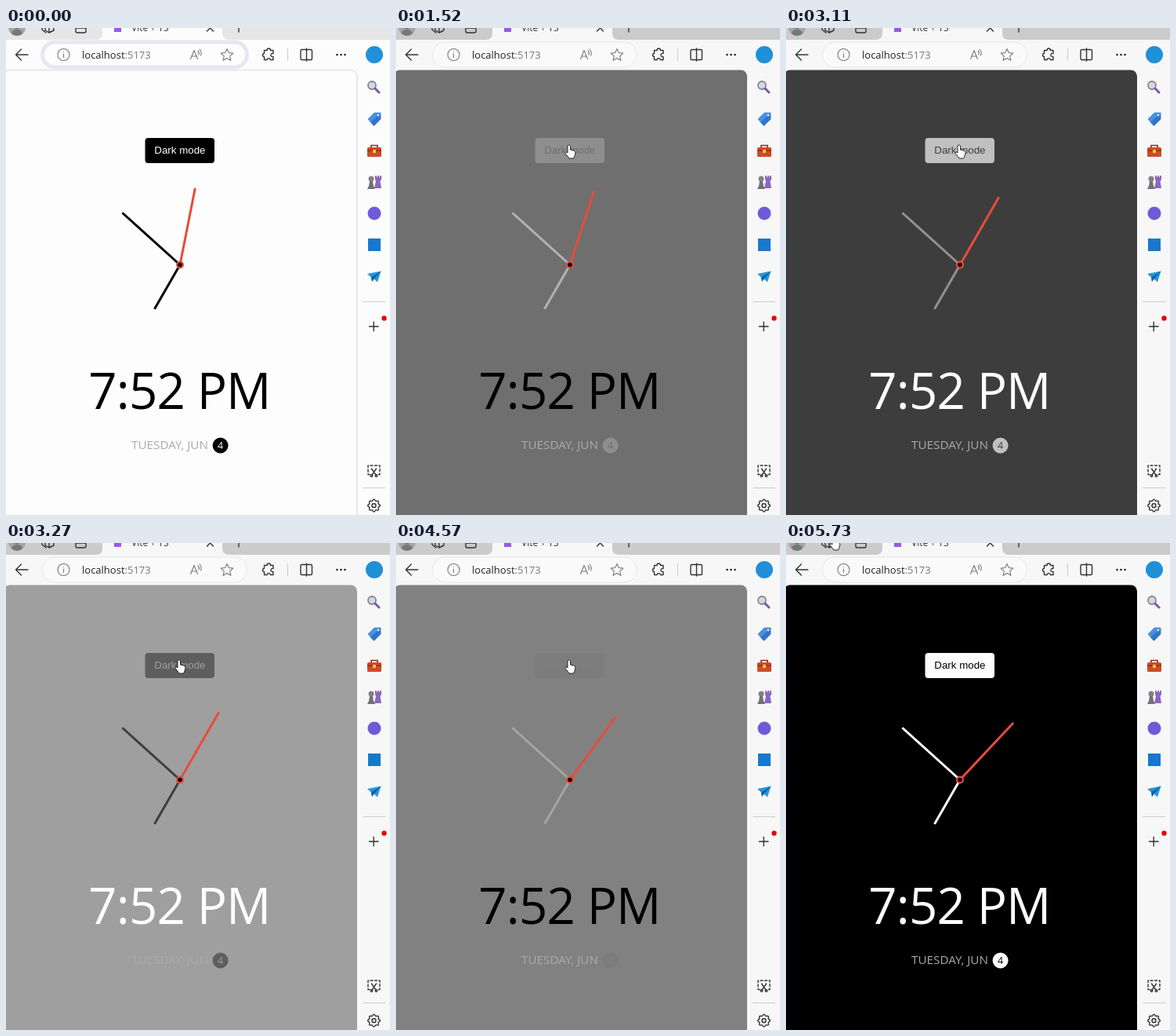
An HTML page that plays this animation: 490 by 620 pixels, repeating every 5820 ms.

```html
<!DOCTYPE html>
<html lang="en">
<head>
<meta charset="utf-8">
<title>Theme clock</title>
<style>
  html, body { margin: 0; width: 100%; height: 100%; overflow: hidden; }
  svg { display: block; width: 490px; height: 620px; font-family: "Open Sans", "Noto Sans", sans-serif; }
  .line { fill: none; stroke: #333; stroke-width: 1.4; stroke-linecap: round; stroke-linejoin: round; }
  .soft { stroke: #777; stroke-width: 1.1; }
  .rule { fill: none; stroke: #ccc; }
  .hand { stroke: var(--hand); stroke-width: 3; }
  .fg { fill: var(--fg); }
  .bg { fill: var(--bg); }
  #chrome { fill: #f7f7f7; }
  #strip { fill: #cbcbcb; }
  #pill { fill: #fafafb; stroke: #e6e6ef; }
  .idle #chrome { fill: #fcfcfd; }
  .idle #strip { fill: #e6e6e6; }
  .idle #pill { fill: #fdfdfe; stroke: #e8e7f1; stroke-width: 5; }
  .idle #page { stroke: #e7e7ee; stroke-width: 2; }
  #cursor path { stroke: #222; stroke-width: 1; stroke-linejoin: round; fill: #fff; }
</style>
</head>
<body>
<svg id="stage" viewBox="0 0 490 620">
  <rect id="chrome" width="490" height="620"/>
  <!-- tab strip -->
  <path id="strip" d="M0 0H123V7Q123 15 114 15H0ZM276 0H490V15H285Q276 15 276 7Z"/>
  <circle cx="14" cy="-1" r="11" fill="#a5a5a5"/>
  <path d="M7 7Q8 2 14 2T21 7Q14 13 7 7Z" fill="#777"/>
  <circle cx="14" cy="-2" r="3.5" fill="#777"/>
  <path class="line" d="M46 -2V2L51 6M50 -3V3L55 6L61 3V-3M55 6V0M89 -4V4Q89 6 91 6H100Q102 6 102 4V-4M89 0H102M256.500 -4L264.500 4M264.500 -4L256.500 4M297 -5V5"/>
  <rect x="138" y="-4" width="9" height="9" fill="#9858e8"/>
  <text x="160" y="4" font-size="12" fill="#333">Vite + TS</text>
  <!-- toolbar -->
  <rect id="pill" x="46.500" y="18" width="261" height="32" rx="16"/>
  <path class="line" d="M28 34H12.500M19.500 27L12.500 34L19.500 41"/>
  <g class="line soft">
    <circle cx="73.500" cy="34" r="7.500"/>
    <path d="M73.500 33V37.500M73.500 30.500V30.600"/>
    <path d="M235.500 39.500L240 28.500L244.500 39.500M237 36H243M245 29Q247 31 246 34M247 27Q250.500 31 248.500 35"/>
    <path d="M282 26.500L284.300 31.500L289.800 32.100L285.700 35.800L286.900 41.200L282 38.400L277.100 41.200L278.300 35.800L274.200 32.100L279.700 31.500Z"/>
  </g>
  <text x="97" y="39" font-size="13" fill="#222">localhost<tspan fill="#777">:5173</tspan></text>
  <path class="line" d="M329.500 28.500H333Q333 26 335.200 26T337.500 28.500H341V32.500Q338 32 338 34.500T341 36.500V40.500H337.500Q337 38.500 335.200 38.500T333 40.500H329.500V36.500Q327.500 36.500 327.500 34.500T329.500 32.500Z"/>
  <path class="rule" d="M359.500 26V42"/>
  <path class="line" d="M383 27.500H377.500Q376 27.500 376 29V39Q376 40.500 377.500 40.500H383M383.500 26V42M384 27.500H389Q390.500 27.500 390.500 29V39Q390.500 40.500 389 40.500H384"/>
  <g fill="#222"><circle cx="422.500" cy="34" r="1.300"/><circle cx="427.500" cy="34" r="1.300"/><circle cx="432.500" cy="34" r="1.300"/></g>
  <circle cx="470" cy="34" r="11" fill="#2090d8"/>
  <!-- sidebar -->
  <circle cx="467" cy="73" r="5" fill="#d4d8e2" stroke="#85858e" stroke-width="1.800"/>
  <path d="M471 77L476 82" stroke="#8056a8" stroke-width="3" stroke-linecap="round"/>
  <path d="M462 116L470 108H478V116L469.500 124.500Z" fill="#4a90e2" stroke="#4a90e2" stroke-linejoin="round"/>
  <path d="M462 117L465 120L477.500 109L478 116L469.500 124.500Z" fill="#3474c8"/>
  <circle cx="475" cy="111" r="1.300" fill="#fff"/>
  <path d="M466 152V149.500H474V152" fill="none" stroke="#843520" stroke-width="1.700"/>
  <rect x="461" y="152" width="18" height="12" rx="1.500" fill="#cf4b24"/>
  <path d="M461 156H479" stroke="#8d3019" stroke-width="1.500"/>
  <rect x="468" y="155" width="4" height="4" fill="#f3c15b"/>
  <path d="M471 188H473V190H474V188H476V190H477V188H479V193L477.500 195L479 204H470L472 195L471 193Z" fill="#8a66c4"/>
  <circle cx="466" cy="192" r="3.500" fill="#808088"/>
  <path d="M464 195H468L469 201L471 205H461L463 201Z" fill="#707078"/>
  <circle cx="470" cy="236" r="8.500" fill="#6d5bd8"/>
  <rect x="462" y="268" width="16" height="16" fill="#1878cc"/>
  <path d="M461 313L478.500 309.500L474 323.500L469.500 319.500L467 323L466 317.500Z" fill="#2496dc"/>
  <path d="M466 317.500L478.500 309.500L469.500 319.500L467 323Z" fill="#11619f"/>
  <path class="rule" d="M455.500 348.500H484M455.500 585.500H484"/>
  <path class="line" d="M463.500 380H475M469.200 374.300V385.700"/>
  <circle cx="482.500" cy="369.500" r="3.200" fill="#e00b0b"/>
  <path class="line" stroke-dasharray="3 2.500" d="M464 568.500H462V557H477V568.500H475"/>
  <path class="line" d="M466.500 561L472 569M472.500 561L467 569"/>
  <g class="line">
    <circle cx="466.500" cy="570" r="1.300"/><circle cx="472.500" cy="570" r="1.300"/>
    <circle cx="469.500" cy="608" r="2.500"/>
    <path id="gear" transform="translate(469.500 608)"/>
  </g>
  <!-- page -->
  <rect id="page" class="bg" x="-3" y="53.500" width="451" height="580" rx="8"/>
  <rect class="fg" x="177.500" y="140" width="88.500" height="32" rx="4"/>
  <text class="bg" x="189.300" y="160" font-size="13.333" font-family="Liberation Sans, Arial, sans-serif">Dark mode</text>
  <g transform="translate(222 301.500)">
    <path class="hand" d="M0 0V-65" transform="rotate(210)"/>
    <path class="hand" d="M0 0V-99" transform="rotate(312)"/>
    <path id="second" d="M0 0V-99.500" stroke="#e74c3c" stroke-width="3"/>
    <circle r="5" fill="#e74c3c"/>
    <circle r="2.800"/>
  </g>
  <text x="221.500" y="485" font-size="63.500" letter-spacing="-.8" text-anchor="middle" style="fill:var(--time)">7:52 PM</text>
  <text x="160" y="536" font-size="15.250" fill="#aaa">TUESDAY, JUN</text>
  <circle class="fg" cx="273.600" cy="531.500" r="10"/>
  <text class="bg" x="273.600" y="536" font-size="12.500" text-anchor="middle">4</text>
  <g id="cursor">
    <path id="pointer" d="M-2 1Q0 -1.500 1.500 1V6L6 7Q8 8 8 10L7 14L5.500 17H0L-5 10.500Q-5.500 8 -3 9L-2 10Z"/>
    <path id="arrow" d="M0 0V15L3.500 11.800L6 17L8.200 16L5.800 11H10.500Z"/>
  </g>
</svg>
<script>
const LOOP = 5820, FADE = 500;
const clicks = [1168, 2893, 4245];
// Screen refreshes as [first, last, count], in ms
const bursts = [[0, 60, 2], [200, 720, 6], [830, 1050, 3], [1280, 1520, 3], [1610, 1860, 4],
  [1940, 2380, 6], [2700, 3270, 8], [3360, 3670, 4], [3780, 3900, 2], [4010, 4120, 2],
  [4460, 4460, 1], [4570, 4990, 6], [5080, 5570, 7], [5730, 5730, 1]];
const ticks = bursts.flatMap(([a, b, n]) =>
  Array.from({ length: n }, (_, i) => n > 1 ? a + (b - a) * i / (n - 1) : a));

const $ = id => document.getElementById(id);
const clamp = v => Math.min(1, Math.max(0, v));
const linear = v => v;
const smooth = v => v * v * (3 - 2 * v);

// cubic-bezier(.42, 0, 1, 1), solved by bisection
function easeIn(x) {
  let lo = 0, hi = 1;
  for (let i = 0; i < 20; i++) {
    const s = (lo + hi) / 2;
    if (1.26 * s * (1 - s) ** 2 + smooth(s) < x) lo = s; else hi = s;
  }
  return smooth(hi);
}

// 0 = light theme, 1 = dark theme
function darkness(t, ease) {
  const n = clicks.filter(c => c <= t).length;
  if (!n) return 0;
  const p = ease(clamp((t - clicks[n - 1]) / FADE));
  return n % 2 ? p : 1 - p;
}

function gray(name, level) {
  const v = Math.round(253 * level);
  $('stage').style.setProperty(name, `rgb(${v},${v},${v})`);
}

// Settings wheel with eight soft teeth
function gearPath() {
  const points = Array.from({ length: 64 }, (_, i) => {
    const a = i * Math.PI / 32, r = 7 + 0.9 * Math.cos(8 * a);
    return `${(r * Math.sin(a)).toFixed(2)} ${(r * Math.cos(a)).toFixed(2)}`;
  });
  return `M${points.join('L')}Z`;
}

function draw(ms) {
  const t = ticks.findLast(s => s <= ms + 0.01);
  const dark = darkness(t, easeIn);
  gray('--fg', dark);
  gray('--bg', 1 - dark);
  gray('--hand', darkness(t, linear));
  gray('--time', darkness(t - 440, easeIn));
  $('stage').classList.toggle('idle', t < 1280);

  const beat = t + 460, sec = Math.floor(beat / 1000);
  const angle = 6 * (sec + 1 + easeIn(clamp(beat % 1000 / FADE)));
  $('second').setAttribute('transform', `rotate(${angle})`);

  const p = t < 3000 ? smooth(clamp((t - 200) / 850)) : 1 - smooth(clamp((t - 5050) / 520));
  const x = 61 + 160 * p, y = -8 + 157 * p;
  const onPage = y > 54 && y < 140;
  $('cursor').setAttribute('transform', `translate(${x} ${y})`);
  $('cursor').style.display = t < 200 ? 'none' : '';
  $('pointer').style.display = onPage ? 'none' : '';
  $('arrow').style.display = onPage ? '' : 'none';
}

$('gear').setAttribute('d', gearPath());
const start = performance.now();
function frame() {
  draw((performance.now() - start) % LOOP);
  requestAnimationFrame(frame);
}
frame();
</script>
</body>
</html>
```
